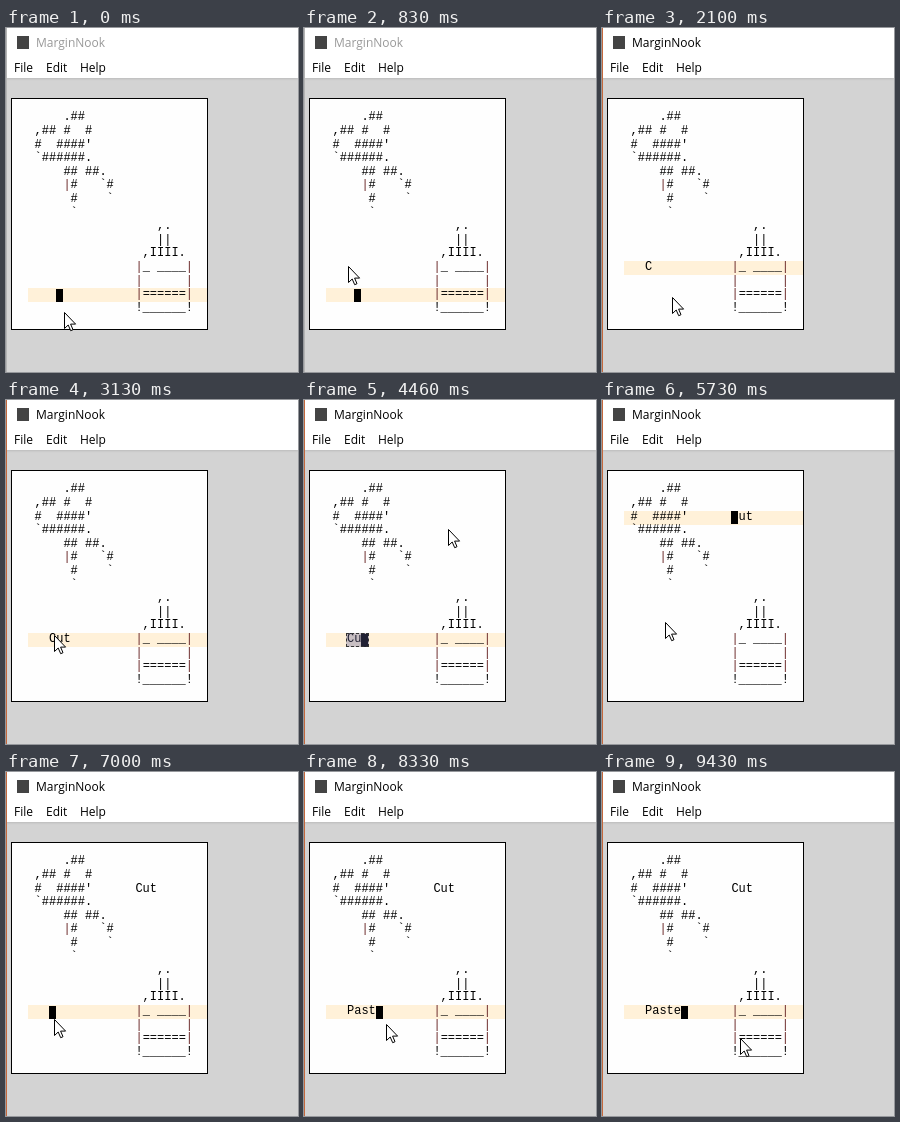
Write an HTML page that moves like this. It is 292 px wide and 344 px high and loops after 9460 ms.

```html
<!DOCTYPE html>
<html lang="en">
<meta charset="utf-8">
<title>Text editor</title>
<style>
  html, body { margin: 0; width: 100%; height: 100%; overflow: hidden; }
  body { position: relative; background: #d3d3d3; font: 12px/16px "Open Sans", sans-serif; color: #000; }
  body *:not(i, path) { position: absolute; white-space: pre; }
  #bar { left: 0; top: 0; width: 292px; height: 50px; background: #fff; box-shadow: 0 1px 2px #bbb; }
  #icon { left: 11px; top: 8px; width: 12px; height: 13px; background: #444; }
  #edge { left: 0; top: 0; width: 1px; height: 344px; }
  #page { left: 5px; top: 70px; width: 195px; height: 230px; background: #fefefe; border: 1px solid #000; }
  #line { left: 22px; width: 179px; height: 14px; background: #fff1d9; }
  .mono { margin: 0; font: 12px/13.59px "Liberation Mono", monospace; }
  .mono i { font-style: normal; color: #6b2a2a; }
  #caret { width: 7px; height: 13px; background: #000; }
  #sel { height: 12px; background: rgba(95, 95, 150, .35); border: 1px dashed #333; }
  #mouse { left: 0; top: 0; overflow: visible; }
</style>
<div id="bar">
  <div id="icon"></div>
  <span id="name" style="left:30px;top:7px">MarginNook</span>
  <span style="left:8px;top:32px">File</span>
  <span style="left:40px;top:32px">Edit</span>
  <span style="left:74px;top:32px">Help</span>
</div>
<div id="edge"></div>
<div id="page"></div>
<div id="line"></div>
<pre id="art" class="mono">
     .##
 ,## #  #
 #  ####'
 `######.
     ## ##.
     |#   \`#
      #    \`
      \`
                  ,.
                  ||
                ,IIII.
               |_ ____|
               |      |
               |======|
               !______!</pre>
<span id="typed" class="mono"></span>
<span id="pasted" class="mono">Cut</span>
<div id="caret"></div>
<div id="sel"></div>
<svg id="mouse" width="12" height="20">
  <path d="M.5 .5V16.5L4.2 13L6.7 18.7L9 17.7L6.6 12.1H11.6Z" fill="#fff" stroke="#000"/>
</svg>
<script>
const LOOP = 9460, LEFT = 21.4, TOP = 83.4, CELL = 7.2, ROW = 13.59;
const el = id => document.getElementById(id);
const x = col => LEFT + col * CELL;
const y = row => TOP + row * ROW;

// time, row, column, visible
const carets = [
  [0, 13, 4, 1], [60, 13, 4, 0], [560, 13, 4, 1],
  [860, 11, 3, 1], [1160, 11, 3, 0], [1400, 11, 3, 1], [1660, 11, 4, 1], [2100, 11, 4, 0],
  [2200, 11, 5, 1], [2300, 11, 6, 1], [2730, 11, 6, 0], [3230, 11, 6, 1],
  [3400, 11, 3, 1], [3680, 11, 4, 1], [3780, 11, 5, 1],
  [4700, 2, 15, 1], [5200, 2, 15, 0], [5600, 2, 15, 1], [6030, 2, 15, 0],
  [6460, 11, 3, 1], [6615, 11, 3, 0], [7000, 11, 3, 1],
  [7460, 11, 4, 1], [7860, 11, 5, 1], [8060, 11, 6, 1], [8230, 11, 7, 1], [8400, 11, 8, 1],
  [8730, 11, 8, 0], [9130, 11, 8, 1]
];
const typing = [
  [0, ""], [1660, "C"], [2200, "Cu"], [2300, "Cut"], [4600, ""],
  [7460, "P"], [7860, "Pa"], [8060, "Pas"], [8230, "Past"], [8400, "Paste"]
];
// start, end, first column
const selections = [[860, 990, 3], [3400, 4600, 3], [4700, 4830, 15], [6460, 6615, 3]];
// time, x, y
const moves = [
  [0, 58, 284], [230, 58, 284], [800, 44, 238], [1260, 44, 238], [1660, 70, 269], [2630, 70, 269],
  [3130, 48, 235], [3380, 44, 238], [3600, 44, 239], [3850, 62, 238], [4000, 62, 238],
  [4460, 144, 129], [4530, 141, 119], [4620, 132, 118], [5150, 132, 118],
  [5730, 63, 222], [5980, 37, 245], [6260, 48, 247], [8200, 48, 247],
  [8560, 160, 262], [8730, 148, 264], [9385, 148, 264], [9430, 138, 266], [LOOP, 138, 266]
];

const current = (list, t) => list.findLast(step => step[0] <= t);

function mouseAt(t) {
  const i = moves.findIndex(m => m[0] > t);
  const [t0, x0, y0] = moves[i - 1], [t1, x1, y1] = moves[i];
  const u = (t - t0) / (t1 - t0), e = u * u * (3 - 2 * u);
  return [x0 + (x1 - x0) * e, y0 + (y1 - y0) * e].map(Math.round);
}

function place(id, left, top) {
  el(id).style.left = left + "px";
  el(id).style.top = top + "px";
}

function show(id, visible) {
  el(id).style.visibility = visible ? "visible" : "hidden";
}

function draw(now) {
  const t = now % LOOP, active = t >= 860;
  el("name").style.color = active ? "#000" : "#999";
  el("edge").style.background = active ? "#c4683c" : "#b4b4b4";

  const [, row, col, visible] = current(carets, t);
  const top = Math.round(y(row));
  el("line").style.top = top + "px";
  place("caret", Math.round(x(col)), top + (row === 2 ? 0 : 1));
  show("caret", visible);

  el("typed").textContent = current(typing, t)[1];
  show("pasted", t >= 5000);

  const sel = selections.find(([from, to]) => t >= from && t < to);
  show("sel", sel);
  if (sel) {
    place("sel", Math.round(x(sel[2])) - 1, top);
    el("sel").style.width = Math.round((col - sel[2] + 1) * CELL) - 1 + "px";
  }

  const [mx, my] = mouseAt(t);
  el("mouse").style.transform = `translate(${mx}px, ${my}px)`;
  requestAnimationFrame(draw);
}

const art = el("art");
art.innerHTML = art.textContent.replaceAll("\\", "").replace(/(?<!\|)\|(?!\|)/g, "<i>|</i>");
place("art", x(0), y(0));
place("typed", x(3), y(11));
place("pasted", x(15), y(2));
requestAnimationFrame(draw);
</script>
</html>
```
